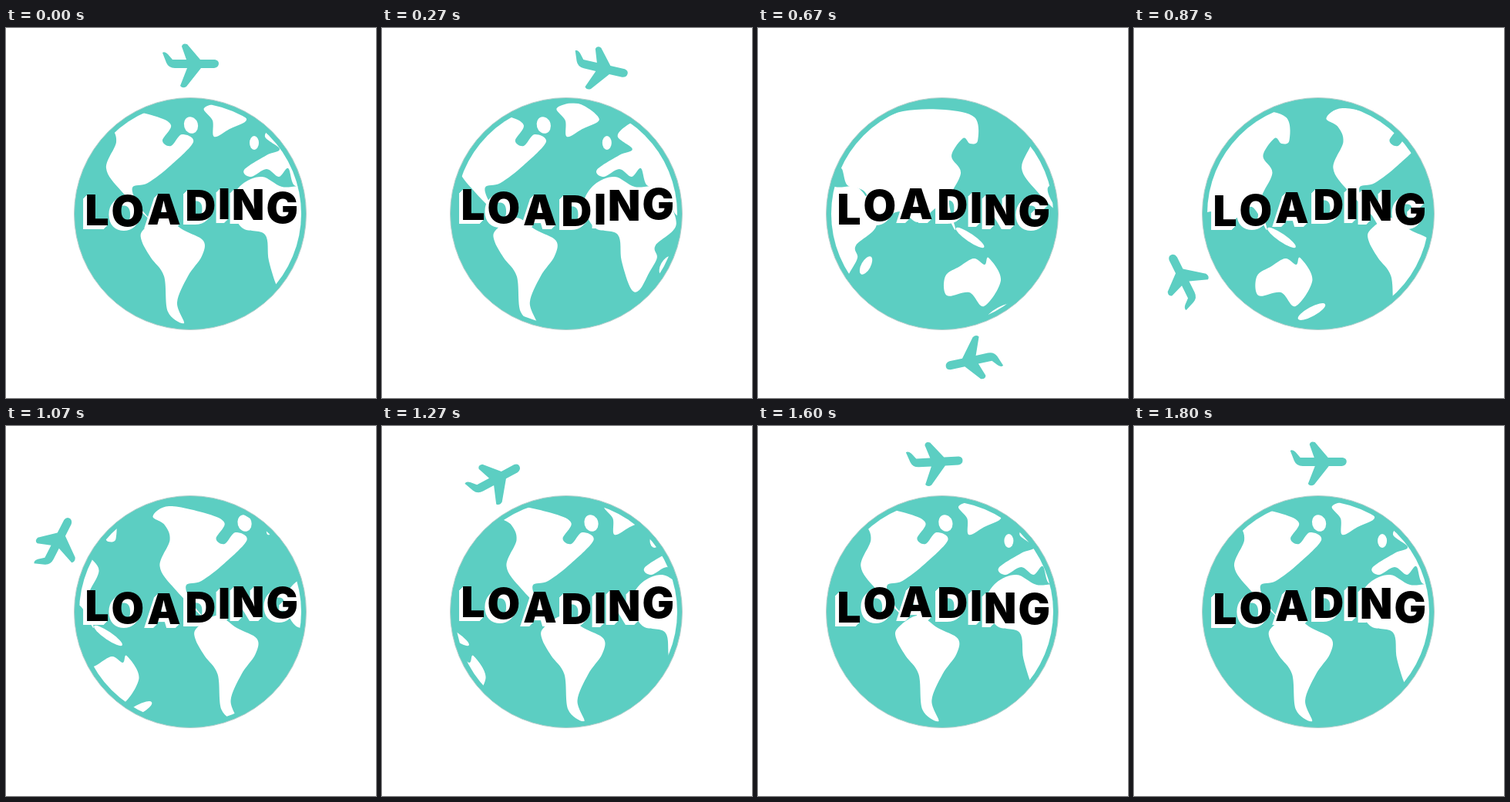
Write an HTML page with a canvas that moves like this. It is 480 px wide and 480 px high and loops after 1.87 s.

```html
<!DOCTYPE html>
<html lang="en">
<head>
<meta charset="utf-8">
<title>Loading</title>
<style>
html, body { margin: 0; width: 100%; height: 100%; overflow: hidden; background: #fff; }
canvas { display: block; width: 480px; height: 480px; }
</style>
</head>
<body>
<canvas id="stage" width="480" height="480"></canvas>
<script>
const ctx = document.getElementById('stage').getContext('2d');
const LOOP = 1870, STEPS = 28, STEP = 200 / 3;
const TEAL = '#5ccec2';
const CX = 239, CY = 241, GLOBE_R = 150.5, LAND_R = 144, ORBIT_R = 193;
const MAP_W = 470;

// Key points of each coast on a flat map that scrolls behind a round window.
const coasts = {
  northAmerica: '121,117 142,104 192,114 214,126 203,146 214,153 228,138 243,148 214,178 ' +
    '184,201 164,207 172,230 190,252 150,212 130,182 143,148 136,128',
  southAmerica: '178,262 204,246 230,262 256,276 254,296 236,322 222,356 231,383 ' +
    '210,368 205,322 188,298 176,276',
  greenland: '257,104 285,98 312,118 290,131 270,141 268,120',
  eurasia: '336,141 347,127 361,122 369,133 397,126 446,108 500,106 539,116 543,146 533,150 ' +
    '524,143 509,166 521,188 506,224 514,262 494,232 466,252 444,238 414,244 396,212 ' +
    '374,204 366,182 354,193 338,183 318,193 309,184 338,165 355,157',
  africa: '292,228 306,203 332,193 358,206 390,209 412,254 385,282 387,298 377,317 ' +
    '364,340 353,338 341,302 336,268 306,259',
  australia: '501,322 520,309 538,299 552,307 557,298 573,327 551,361 532,343 503,347'
};

// Islands: centre, radii, tilt.
const islands = [
  [240, 126, 9, 11, -0.3],
  [322, 149, 6, 9, 0],
  [398, 308, 6, 13, 0.5],
  [533, 272, 22, 5, 0.6],
  [572, 368, 20, 6, -0.5]
];

// Closed Catmull-Rom curve through the points.
function coastPath(text) {
  const pts = text.split(' ').map(p => p.split(',').map(Number));
  const at = i => pts[(i + pts.length) % pts.length];
  const handle = (i, sign) => [0, 1].map(k => at(i)[k] + sign * (at(i + 1)[k] - at(i - 1)[k]) / 6);
  const path = new Path2D();
  path.moveTo(...pts[0]);
  pts.forEach((_, i) => path.bezierCurveTo(...handle(i, 1), ...handle(i + 1, -1), ...at(i + 1)));
  return path;
}

const land = Object.values(coasts).map(coastPath);
for (const [x, y, rx, ry, tilt] of islands) {
  const path = new Path2D();
  path.ellipse(x, y, rx, ry, tilt, 0, Math.PI * 2);
  land.push(path);
}

const plane = new Path2D(
  'M-36 -16 Q-33 -18 -29 -14 L-23 -7 L-5 -7 L-11 -24 Q-10 -29 -4 -27 L13 -7 L32 -7 ' +
  'Q37 -6 37 -2 Q37 3 31 4 L14 4 L-5 28 Q-10 31 -13 27 L-4 4 L-20 4 Q-28 4 -31 -3 Z');

// Speeds up until the turn, then slows down for the rest of the loop.
function ease(t, turn) {
  return t < turn
    ? turn * (t / turn) ** 3
    : 1 - (1 - turn) * ((1 - t) / (1 - turn)) ** 2.75;
}

function disc(r) {
  ctx.beginPath();
  ctx.arc(CX, CY, r, 0, Math.PI * 2);
}

function drawGlobe(turned) {
  disc(GLOBE_R);
  ctx.fillStyle = TEAL;
  ctx.fill();
  ctx.strokeStyle = '#b4cfcc';
  ctx.lineWidth = 1;
  ctx.stroke();
  ctx.save();
  disc(LAND_R);
  ctx.clip();
  ctx.fillStyle = '#fff';
  ctx.translate(-(turned + 1) * MAP_W, 0);
  for (let copy = 0; copy < 3; copy++) {
    for (const path of land) ctx.fill(path);
    ctx.translate(MAP_W, 0);
  }
  ctx.restore();
}

function drawPlane(turned) {
  ctx.save();
  ctx.translate(CX, CY);
  ctx.rotate(turned * Math.PI * 2);
  ctx.translate(0, -ORBIT_R);
  ctx.fillStyle = TEAL;
  ctx.fill(plane);
  ctx.restore();
}

const centres = { L: 118.5, O: 157.5, A: 205, D: 252.5, I: 283, N: 314, G: 358 };

function drawText(step) {
  ctx.font = '900 55px Inter, "Open Sans", sans-serif';
  const placed = Object.entries(centres).map(([ch, cx], i) => {
    const m = ctx.measureText(ch);
    const x = cx - (m.actualBoundingBoxRight - m.actualBoundingBoxLeft) / 2;
    const y = 252.5 - 5 * Math.cos(2 * Math.PI * (step - 5.5 - 2 * i) / 14);
    return [ch, x, y];
  });
  ctx.fillStyle = '#fff';
  for (const [ch, x, y] of placed)
    for (let d = 1; d <= 5; d++) ctx.fillText(ch, x - d, y + d);
  ctx.fillStyle = '#000';
  for (const [ch, x, y] of placed) ctx.fillText(ch, x, y);
}

function draw() {
  const time = performance.now() % LOOP;
  const step = Math.min(STEPS - 1, Math.floor((time + 4) / STEP));
  ctx.fillStyle = '#fff';
  ctx.fillRect(0, 0, 480, 480);
  drawGlobe(ease(step / STEPS, 0.213));
  drawPlane(ease(step / STEPS, 0.285));
  drawText(step);
  requestAnimationFrame(draw);
}
draw();
</script>
</body>
</html>
```
